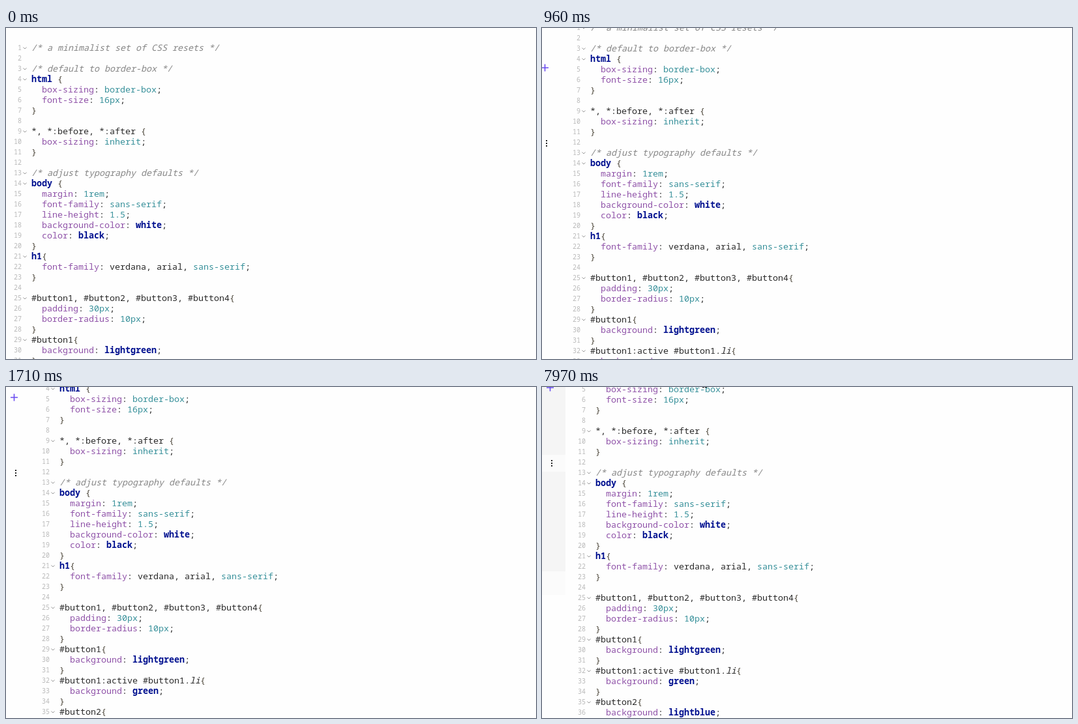
Animation, 813 px wide and 508 px high, one loop 8 s. Source, as an HTML page:

```html
<!DOCTYPE html>
<html lang="en">
<head>
<meta charset="utf-8">
<title>Stylesheet editor</title>
<style>
html, body { margin: 0; width: 100%; height: 100%; overflow: hidden; background: #fefefe; }
#stage { position: fixed; inset: 0; overflow: clip; contain: strict; }
#page, svg { position: absolute; left: 0; top: 0; overflow: visible; }
pre { position: absolute; margin: 0; line-height: 16px; font-family: "Noto Sans Mono", "DejaVu Sans Mono", monospace; }
#code { left: 39px; top: 22px; font-size: 13.3333px; color: #2a2a2a; }
#nums { left: 0; top: 22px; width: 24px; font-size: 10px; text-align: right; color: #b9b9b9; }
.note { color: #868686; font-style: italic; }
.tag, .name { color: #00108f; font-weight: bold; }
.prop { color: #8f52a8; }
.value { color: #37909a; }
.brace { color: #4a4438; }
.cls { font-style: italic; }
</style>
</head>
<body>
<div id="stage">
  <svg id="bar" width="36" height="319">
    <path fill="#f5f5f5" d="M0 0h36v104H0zM0 130h36v153H0z"/>
    <path fill="#fbfbfb" d="M0 104h36v26H0zM0 283h36v36H0z"/>
  </svg>
  <div id="page">
    <svg width="40" height="600" fill="none">
      <path stroke="#6a4df0" stroke-width="1.6" d="M-36 92h11M-30.5 86.5v11"/>
      <path fill="#222" d="M-29 203h2v2h-2zM-29 207h2v2h-2zM-29 211h2v2h-2z"/>
      <path id="folds" stroke="#999"/>
    </svg>
    <pre id="nums"></pre>
    <pre id="code"></pre>
  </div>
  <svg id="cursor" width="7" height="16"><path d="M0 0h3v1H0zM4 0h3v1H4zM3 1h1v14H3zM0 15h3v1H0zM4 15h3v1H4z"/></svg>
</div>
<script>
const lines = `/* a minimalist set of CSS resets */

/* default to border-box */
html {
  box-sizing: border-box;
  font-size: 16px;
}

*, *:before, *:after {
  box-sizing: inherit;
}

/* adjust typography defaults */
body {
  margin: 1rem;
  font-family: sans-serif;
  line-height: 1.5;
  background-color: white;
  color: black;
}
h1{
  font-family: verdana, arial, sans-serif;
}

#button1, #button2, #button3, #button4{
  padding: 30px;
  border-radius: 10px;
}
#button1{
  background: lightgreen;
}
#button1:active #button1.li{
  background: green;
}
#button2{
  background: lightblue;`.split("\n");

const $ = id => document.getElementById(id);
const kinds = ["note", "tag", "prop", "name", "value", "brace", "cls"];
const token = /(\/\*.*)|^(html|body|h1)|^( +[\w-]+)(?=:)|\b(white|black|lightgreen|green|lightblue)\b|(border-box|inherit|sans-serif|\d+px|\d+rem|1\.5)|([{}])|(\.li)/g;
const paint = line => line.replace(token, (text, ...groups) =>
  `<span class="${kinds[groups.findIndex(g => g !== undefined)]}">${text}</span>`);

$("code").innerHTML = lines.map(paint).join("\n");
$("nums").textContent = lines.map((_, i) => i + 1).join("\n");
$("folds").setAttribute("d", lines.map((line, i) =>
  /^\/\*|\{$/.test(line) ? `M26.5 ${29.5 + 16 * i}l2.5 2.5 2.5-2.5` : "").join(""));

const LOOP = 8000, STEP = 131, HOVER = 7310;

// Key points: step, x, y
const pan = [[0, 0, 0], [1, 10, 0], [4, 23, 0], [5, 34, -19], [9, 36, -43], [13, 43, -76], [14, 43, -76], [17, 43, -91]];
const pointer = [[0, 161, 246], [1, 128, 94], [2, 107, 50], [3, 163, 9], [5, 246, -15]];

// Place an element on its path, moving in whole time steps
function follow(id, path, time) {
  const step = Math.max(0, Math.floor(time / STEP));
  const a = path.findLast(p => p[0] <= step);
  const b = path.find(p => p[0] > step) || a;
  const part = (step - a[0]) / (b[0] - a[0] || 1);
  const [x, y] = [1, 2].map(i => Math.round(a[i] + (b[i] - a[i]) * part));
  $(id).style.transform = `translate(${x}px, ${y}px)`;
}

function draw() {
  const t = performance.now() % LOOP;
  follow("page", pan, t);
  follow("cursor", pointer, t - HOVER);
  for (const id of ["bar", "cursor"]) $(id).style.display = t < HOVER ? "none" : "block";
  requestAnimationFrame(draw);
}
draw();
</script>
</body>
</html>
```
